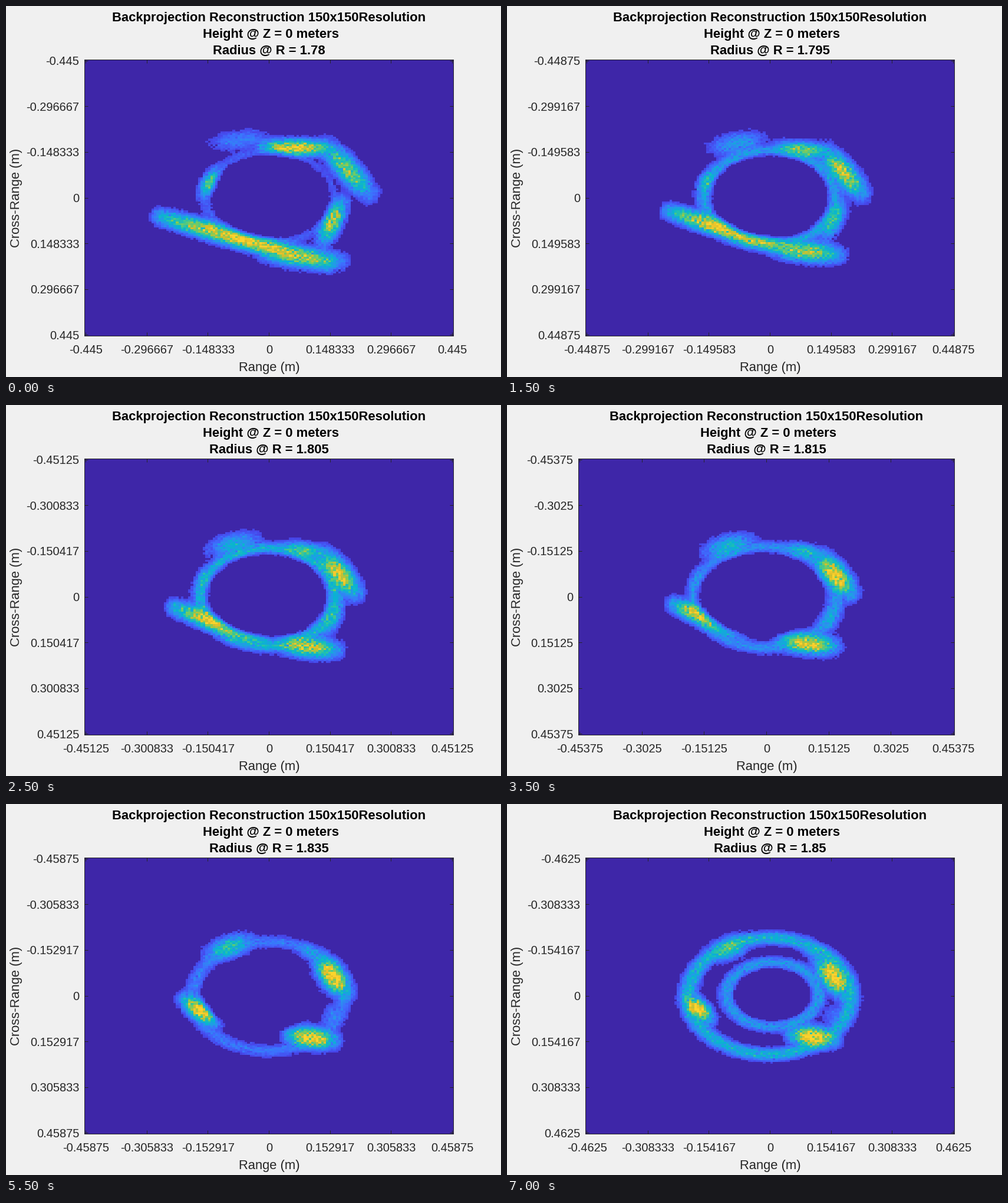
Write a matplotlib script that moves like this. It is 840 px wide and 630 px high and loops after 7500 ms.

```python
import numpy as np
import matplotlib.pyplot as plt
from matplotlib.animation import FuncAnimation
from matplotlib.collections import LineCollection
from matplotlib.colors import LinearSegmentedColormap

W, H, DPI = 840, 630, 100
PT = 72 / DPI
RIGHT, TOP, BOTTOM = 759.5, 91.5, 560.5
MID_Y = (TOP + BOTTOM) / 2
CELLS, STEPS = 150, 15
DARK = "#262626"
FLOOR = .1

PARULA = LinearSegmentedColormap.from_list("parula", [
    "#3E26A8", "#4747EB", "#3E6FFF", "#2797EB", "#08B5D0",
    "#31C69F", "#81CC59", "#DCBD29", "#FCCF30", "#F9FB15"])

cell = np.arange(CELLS) - (CELLS - 1) / 2
U, V = np.meshgrid(cell * 626 / CELLS, cell * 469 / CELLS)
FRINGE = np.cos(2 * np.pi * np.hypot(U, V) / 6.5)


def lerp(a, b, t):
    return a + (np.asarray(b) - a) * t


class Streak:
    """A bright line segment that slides and changes level over the loop."""

    def __init__(self, width, start, end, level):
        self.width, self.level = width, level
        self.start, self.end = np.array(start), np.array(end)

    def glow(self, t):
        ease = np.sin(t * np.pi / 2)
        x0, y0, x1, y1 = lerp(self.start, self.end, ease)
        dx, dy = x1 - x0, y1 - y0
        s = np.clip(((U - x0) * dx + (V - y0) * dy) / (dx * dx + dy * dy), 0, 1)
        dist = np.hypot(U - x0 - s * dx, V - y0 - s * dy)
        taper = 1 - .55 * (2 * s - 1) ** 2
        return lerp(*self.level, ease) * taper * np.exp(-(dist / self.width) ** 2)


# Segments x0, y0, x1, y1 from the plot's centre: first and last pose
STREAKS = [
    Streak(16, (-186, 32, 100, 112), (-140, 6, -105, 38), (.85, .9)),    # lower left
    Streak(18, (-5, 96, 120, 108), (40, 66, 105, 74), (.6, .92)),        # bottom
    Streak(17, (122, 8, 92, 72), (115, 15, 95, 50), (.72, .2)),          # lower right
    Streak(20, (98, -86, 168, -8), (88, -56, 124, -8), (.65, .95)),      # upper right
    Streak(14, (-10, -86, 100, -84), (55, -82, 85, -66), (.85, .3)),     # top
    Streak(19, (-95, -92, -5, -103), (-100, -70, -40, -92), (.26, .55)), # upper left
    Streak(14, (-112, -6, -90, -44), (-132, -10, -115, -50), (.6, .15)), # left
]


def oval(cx, cy, a, b):
    return np.hypot((U - cx) / a, (V - cy) / b)


def ring(cx, cy, a, b, width, level):
    dist = (oval(cx, cy, a, b) - 1) * np.sqrt(a * b)
    return level * np.exp(-(dist / width) ** 2)


def field(n):
    t = n / (STEPS - 1)
    late = np.clip((n - 10) / 4, 0, 1)
    grow = t ** 1.5

    # The base ring pulses as it widens; an inner ring appears last
    parts = [s.glow(t) for s in STREAKS]
    parts.append(ring(-2, 1, lerp(106, 138, grow), lerp(78, 99, grow),
                      14, .3 - .13 * np.cos(3 * np.pi * t)))
    parts.append(ring(4, -2, 78, 55, 13, .33 * late))
    glow = sum(p ** 3 for p in parts) ** (1 / 3)

    # The empty middle drifts left, then closes in
    size = 1 - .39 * late
    hole = oval(3 - 22 * np.sin(np.pi * t * t), -2, lerp(91, 97, t) * size, 65 * size)
    glow *= np.clip((hole - .97) * 5, 0, 1)

    rng = np.random.default_rng(40 + n)
    grain = rng.standard_normal(U.shape)
    glow = glow * (1 + .12 * grain + .1 * FRINGE)
    return np.where(glow > FLOOR, np.minimum(glow, .9), 0)


plt.rcParams["font.family"] = "Liberation Sans"
fig = plt.figure(figsize=(W / DPI, H / DPI), dpi=DPI, facecolor="#F0F0F0")
ax = fig.add_axes([0, 0, 1, 1])
ax.axis("off")
image = ax.imshow(np.zeros((CELLS, CELLS)), cmap=PARULA, vmin=0, vmax=1,
                  interpolation="nearest", aspect="auto",
                  extent=(133.5, RIGHT, BOTTOM, TOP))
ax.set_xlim(0, W)
ax.set_ylim(H, 0)
lines = LineCollection([], colors=DARK, linewidths=PT, zorder=3)
lines.set_snap(False)
ax.add_collection(lines, autolim=False)


def label(x, y, text="", size=20, ha="center", color=DARK, **kw):
    return ax.text(x, y, text, fontsize=size * PT, ha=ha, va="baseline",
                   color=color, **kw)


titles = [label(0, y, size=22, color="black", weight="bold") for y in (26, 54, 82)]
x_name = label(0, 620, "Range (m)", 22)
y_name = label(0, MID_Y, "Cross-Range (m)", 22, rotation=90, rotation_mode="anchor")
x_ticks = [label(0, 590) for _ in range(7)]
y_ticks = [label(0, 0, ha="right") for _ in range(7)]


def update(n):
    radius = 1.78 + .005 * n
    names = [f"{k * radius / 12:.6g}" for k in range(-3, 4)]
    longest = max(map(len, names))

    # The plot widens when the tick labels get shorter
    left = max(109.5, 133.5 - 12 * (9 - longest))
    mid_x = (left + RIGHT) / 2
    y_name.set_x(23 + 11.1 * max(0, 7 - longest))
    x_name.set_x(mid_x)
    rows = [("Backprojection Reconstruction 150x150Resolution", 0),
            ("Height @ Z = 0 meters", 3),
            (f"Radius @ R = {radius:.6g}", 0)]
    for title, (text, shift) in zip(titles, rows):
        title.set_text(text)
        title.set_x(mid_x + shift)

    image.set_data(field(n))
    image.set_extent((left, RIGHT, BOTTOM, TOP))

    x0, x1, y0, y1 = left - .5, RIGHT + .5, TOP - .5, BOTTOM + .5
    segs = [[(x0, TOP), (x1, TOP)], [(x0, BOTTOM), (x1, BOTTOM)],
            [(left, y0), (left, y1)], [(RIGHT, y0), (RIGHT, y1)]]
    for k, name in enumerate(names):
        f = (k - 3) / 6 * (1 - 1 / CELLS)
        x = mid_x + f * (RIGHT - left)
        y = MID_Y + f * (BOTTOM - TOP)
        x_ticks[k].set_text(name)
        x_ticks[k].set_x(x)
        y_ticks[k].set_text(name)
        y_ticks[k].set_position((left - 9, y + 7))
        tx, ty = np.floor(x) + .5, np.floor(y) + .5
        segs += [[(tx, TOP), (tx, TOP + 6)], [(tx, BOTTOM), (tx, BOTTOM - 6)],
                 [(left, ty), (left + 6, ty)], [(RIGHT, ty), (RIGHT - 6, ty)]]
    lines.set_segments(segs)
    return [image, lines, x_name, y_name, *titles, *x_ticks, *y_ticks]


anim = FuncAnimation(fig, update, frames=STEPS, interval=500, repeat=True)
plt.show()
```
